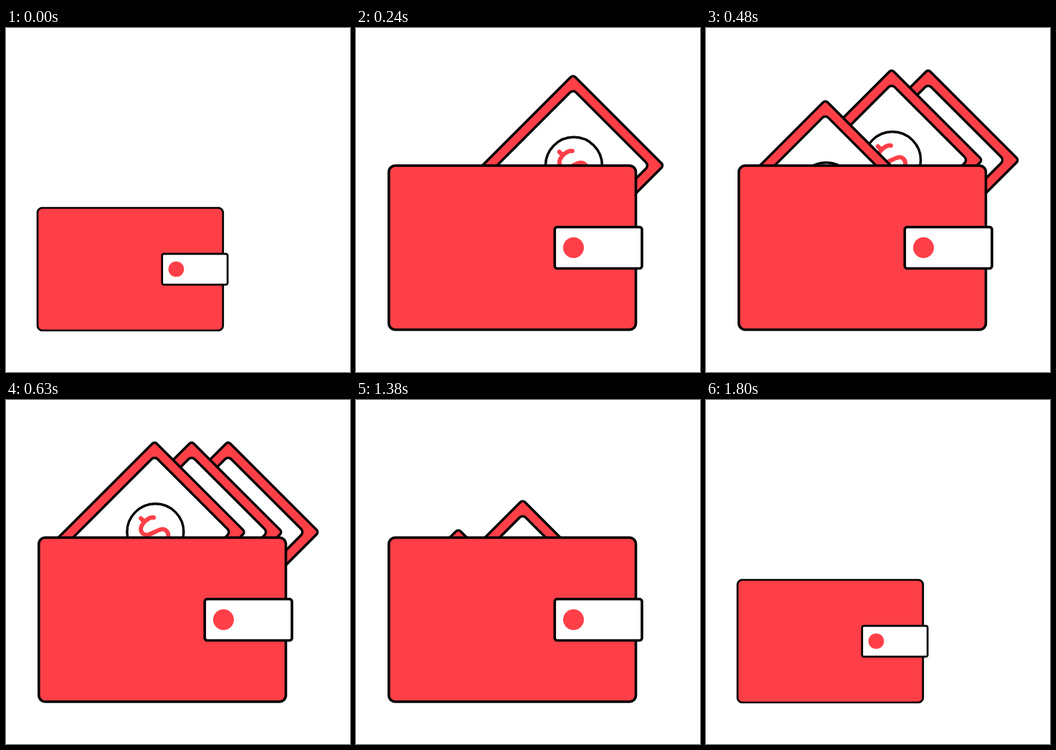
These frames come from a looping animation (480x480 px, 1830 ms). An HTML page with a canvas:

```html
<!DOCTYPE html>
<html lang="en">
<head>
<meta charset="utf-8">
<title>Wallet</title>
<style>
  html, body { margin: 0; width: 100%; height: 100%; overflow: hidden; background: #fff; }
  canvas { display: block; width: 480px; height: 480px; }
</style>
</head>
<body>
<canvas id="stage" width="480" height="480"></canvas>
<script>
const ctx = document.getElementById('stage').getContext('2d');
const RED = '#ff3f48', WHITE = '#fff', BLACK = '#000';
const LOOP = 1830, TICK = 30;

const SMALL = { l: 44, t: 251, r: 302.8, b: 422 };
const FULL = { l: 45.8, t: 192, r: 390.5, b: 421 };
const BILL_X = [310, 259, 207.3]; // back to front

const clamp = v => Math.min(1, Math.max(0, v));
const lerp = (a, b, k) => a + (b - a) * k;
const easeOut = (k, p) => 1 - Math.pow(1 - clamp(k), p);

// Size (0 small, 1 full) and pinch of the wallet
function walletPose(t) {
  if (t < 1530) return {
    size: easeOut(t / 150, 2),
    pinch: Math.sin(Math.PI * clamp(t / 240))
  };
  const k = clamp((t - 1530) / 270);
  return { size: 1 - easeOut(k, 2), pinch: Math.sin(Math.PI * k) };
}

// How far bill i is pushed down into the wallet
function billDrop(i, t) {
  if (t < 900) return 212 * Math.pow(1 - clamp((t - 90 - 150 * i) / 240), 3.4);
  return 4 * Math.pow(Math.max(0, t - 1140 - 75 * (2 - i)), 0.67);
}

function paint(fill, line) {
  if (fill) {
    ctx.fillStyle = fill;
    ctx.fill();
  }
  if (line) {
    ctx.strokeStyle = BLACK;
    ctx.lineWidth = line;
    ctx.stroke();
  }
}

function box(l, t, r, b, radius) {
  ctx.beginPath();
  ctx.moveTo(l + radius, t);
  ctx.arcTo(r, t, r, b, radius);
  ctx.arcTo(r, b, l, b, radius);
  ctx.arcTo(l, b, l, t, radius);
  ctx.arcTo(l, t, r, t, radius);
  ctx.closePath();
}

function dollar() {
  ctx.beginPath();
  ctx.moveTo(13.5, -15);
  ctx.bezierCurveTo(10, -22, -13, -23, -13, -10.5);
  ctx.bezierCurveTo(-13, 2, 13, -2, 13, 10.5);
  ctx.bezierCurveTo(13, 23, -10, 22, -13.5, 15);
  ctx.moveTo(0, -27);
  ctx.lineTo(0, -20);
  ctx.moveTo(0, 20);
  ctx.lineTo(0, 27);
  ctx.strokeStyle = RED;
  ctx.lineWidth = 6;
  ctx.stroke();
}

function bill(x, drop) {
  ctx.save();
  ctx.translate(x - 0.95 * drop, 184.3 + drop);
  ctx.rotate(-Math.PI / 4);
  box(-180, -89.5, 89.5, 89.5, 4.5);
  paint(RED, 3.5);
  box(-165.5, -75, 75, 75, 6);
  paint(WHITE, 3.5);
  ctx.beginPath();
  ctx.arc(0.8, 0.8, 39.5, 0, 2 * Math.PI);
  paint(WHITE, 3.5);
  dollar();
  ctx.restore();
}

// Outline points of a rounded box; a full radius gives a circle
function outline(l, t, r, b, radius) {
  const pts = [];
  const cx = [r - radius, l + radius, l + radius, r - radius];
  const cy = [b - radius, b - radius, t + radius, t + radius];
  for (let c = 0; c < 4; c++) {
    for (let j = 0; j <= 8; j++) {
      const a = (c + j / 8) * Math.PI / 2;
      pts.push([cx[c] + radius * Math.cos(a), cy[c] + radius * Math.sin(a)]);
    }
    const n = (c + 1) % 4, a = n * Math.PI / 2;
    const [x, y] = pts[pts.length - 1];
    const ex = cx[n] + radius * Math.cos(a), ey = cy[n] + radius * Math.sin(a);
    for (let j = 1; j < 24; j++) pts.push([lerp(x, ex, j / 24), lerp(y, ey, j / 24)]);
  }
  return pts;
}

const BODY = outline(FULL.l, FULL.t, FULL.r, FULL.b, 9);
const CLASP = outline(277.3, 277.8, 399, 335.5, 3.5);
const BUTTON = outline(289, 292, 318, 321, 14.5);

function wallet({ size, pinch }) {
  const l = lerp(SMALL.l, FULL.l, size), r = lerp(SMALL.r, FULL.r, size);
  const t = lerp(SMALL.t, FULL.t, size), b = lerp(SMALL.b, FULL.b, size);
  const fw = FULL.r - FULL.l, fh = FULL.b - FULL.t;
  const inset = n => 0.5 - pinch * (0.01 + 0.04 * (1 - n * n));
  const line = 3.6 * (r - l) / fw;

  function shape(pts, fill, width) {
    ctx.beginPath();
    for (const [x, y] of pts) {
      const nx = 2 * (x - FULL.l) / fw - 1;
      const ny = 2 * (y - FULL.t) / fh - 1;
      ctx.lineTo((l + r) / 2 + nx * (r - l) * inset(ny),
                 (t + b) / 2 + ny * (b - t) * inset(nx));
    }
    ctx.closePath();
    paint(fill, width);
  }

  shape(BODY, RED, line);
  shape(CLASP, WHITE, line);
  shape(BUTTON, RED, 0);
}

function draw(t) {
  ctx.fillStyle = WHITE;
  ctx.fillRect(0, 0, 480, 480);
  ctx.lineCap = ctx.lineJoin = 'round';

  // Bills show only above the opening and past the right side
  ctx.save();
  ctx.beginPath();
  ctx.rect(0, 0, 480, 196);
  ctx.rect(370, 196, 110, 70);
  ctx.clip();
  BILL_X.forEach((x, i) => bill(x, billDrop(i, t)));
  ctx.restore();

  wallet(walletPose(t));
}

const start = performance.now();
function frame() {
  const t = (performance.now() - start) % LOOP;
  draw(Math.floor(t / TICK) * TICK);
  requestAnimationFrame(frame);
}
frame();
</script>
</body>
</html>
```
